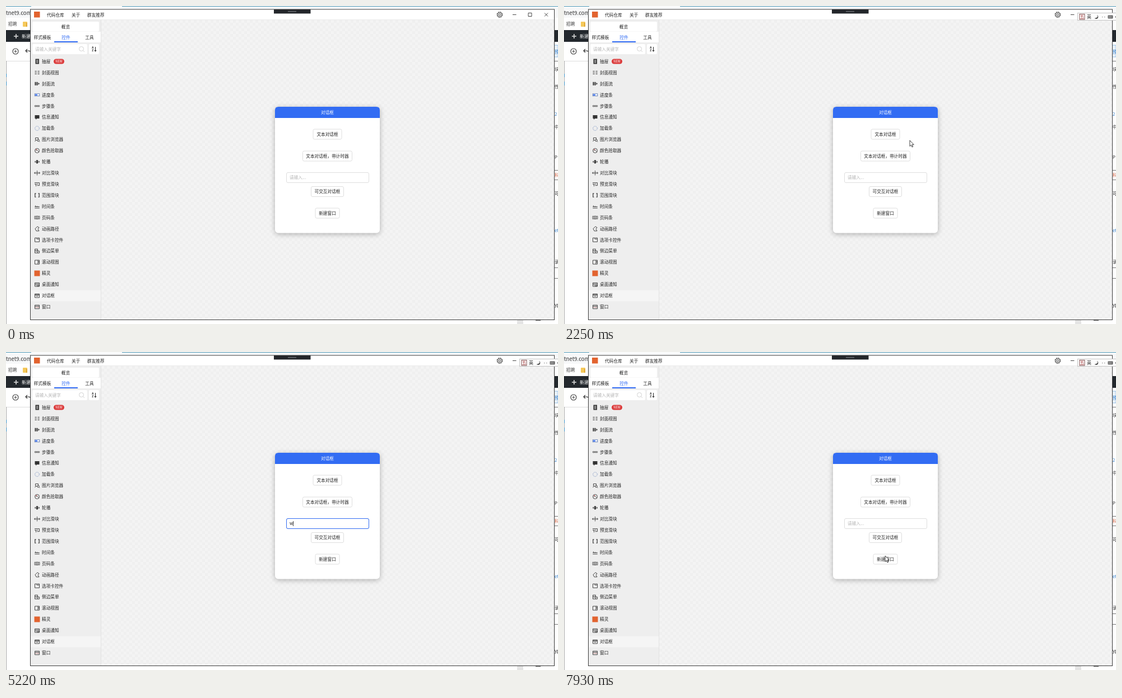
These frames come from a looping animation (985 px wide and 568 px high, 8 s). An HTML page:

```html
<!DOCTYPE html>
<html lang="zh-CN">
<head>
<meta charset="utf-8">
<title>对话框</title>
<style>
html, body { margin: 0; width: 100%; height: 100%; overflow: hidden; background: #fff; }
svg { display: block; width: 100vw; height: 100vh; }
text { font-family: "Noto Sans CJK SC", "Noto Sans CJK JP", "Noto Sans", sans-serif; }
.line { fill: none; stroke: #333; stroke-width: .9; }
.field { fill: #fff; stroke: #dedede; }
.focus { fill: none; stroke: #326cf3; }
.card { filter: drop-shadow(0 2px 5px rgba(0,0,0,.28)); }
.a { animation: 8s linear infinite; }
.step { animation-timing-function: step-end; }
</style>
</head>
<body>
<script>
const BLUE = '#326cf3', ORANGE = '#e2632f';

// Markup helpers; text is placed by its vertical centre.
const text = (x, y, s, o = {}) => {
  const { size = 7.65, fill = '#222', anchor = 'start', weight = 400 } = o;
  return `<text x="${x}" y="${y + size * .37}" font-size="${size}" fill="${fill}" text-anchor="${anchor}" font-weight="${weight}">${s}</text>`;
};
const mid = (x, y, s, o) => text(x, y, s, { anchor: 'middle', ...o });
const rect = (x, y, w, h, fill, r = 0, extra = '') =>
  `<rect x="${x}" y="${y}" width="${w}" height="${h}" rx="${r}" fill="${fill}" ${extra}/>`;
const field = (x, y, w, h, cls = 'field') =>
  `<rect class="${cls}" x="${x + .5}" y="${y + .5}" width="${w - 1}" height="${h - 1}" rx="2.5"/>`;
const line = (d, extra = '') => `<path class="line" d="${d}" ${extra}/>`;
const solid = (d, fill = '#333') => `<path d="${d}" fill="${fill}"/>`;
const ring = (x, y, r, extra = '') => `<circle class="line" cx="${x}" cy="${y}" r="${r}" ${extra}/>`;
const at = (x, y, s) => `<g transform="translate(${x} ${y})">${s}</g>`;
const anim = (name, s, step = true) =>
  `<g class="a ${step ? 'step' : ''}" style="animation-name:${name}">${s}</g>`;

// Keyframes from times in milliseconds.
const LOOP = 8000;
const keyframes = (name, frames) =>
  `@keyframes ${name}{${frames.map(([t, css]) => `${t / LOOP * 100}%{${css}}`).join('')}}`;
const pulses = (name, spans, on = 1, off = 0) => keyframes(name, [
  [0, `opacity:${off}`],
  ...spans.flatMap(([a, b]) => [[a, `opacity:${on}`], [b, `opacity:${off}`]]),
  [LOOP, `opacity:${off}`]]);

const modalTimes = [[835, 2090], [2760, 4110], [6000, 7090]];
const fades = (name, off, on) => keyframes(name, [
  [0, `opacity:${off}`],
  ...modalTimes.flatMap(([a, b]) => [
    [a, `opacity:${off}`], [a + 130, `opacity:${on}`],
    [b, `opacity:${on}`], [b + 120, `opacity:${off}`]]),
  [LOOP, `opacity:${off}`]]);

const clicks = [780, 1990, 2690, 3980, 4800, 5870, 7030].map(t => [t, t + 140]);
const imeShown = clicks.map(([, end], i) => [end, i + 1 < clicks.length ? clicks[i + 1][0] : LOOP - 1]);
const path = [
  [0, 600, 567], [150, 600, 567], [700, 564, 232], [1320, 564, 232], [1900, 626, 224],
  [2130, 626, 224], [2250, 617, 240], [2620, 597, 265], [3000, 597, 265], [3650, 627, 224],
  [4200, 627, 224], [4460, 606, 278], [4780, 558, 306], [5560, 558, 306], [5850, 567, 329],
  [6290, 567, 329], [6540, 540, 262], [6900, 516, 333], [7250, 516, 333], [7720, 573, 356],
  [7850, 573, 359], [7930, 573, 364], [LOOP, 573, 364]];

const css = [
  fades('modal', 0, 1),
  fades('disabled', 1, .4),
  pulses('waiting', [[0, 2600]]),
  pulses('timer', [[2600, 5000]]),
  pulses('prompt', [[5000, 7990]]),
  keyframes('progress', [[0, 'stroke-dasharray:0 100'], [2780, 'stroke-dasharray:0 100'],
    [4230, 'stroke-dasharray:29 100'], [LOOP, 'stroke-dasharray:29 100']]),
  pulses('click', clicks),
  pulses('ime', imeShown),
  pulses('arrow', [[150, 4680], [5600, 7999]]),
  pulses('beam', [[4680, 5210]]),
  pulses('hint', [[0, 5210], [7100, 7999]]),
  pulses('focused', [[4820, 5960]]),
  pulses('caret0', [[4820, 5210]]),
  pulses('typed1', [[5210, 5400]]),
  pulses('typed2', [[5400, 7100]]),
  pulses('caret2', [[5400, 5900]]),
  pulses('hover', [[6390, 6680]]),
  keyframes('move', path.map(([t, x, y]) =>
    [t, `transform:translate(${x}px,${y}px);animation-timing-function:ease-in-out`])),
].join('\n');

// Page behind the window.
const sideBits = [
  [82, '预', '#2878c8'], [113, '块', '#333'], [144, '性', '#333'], [193, '2', '#2878c8'],
  [216, '中', '#333'], [270, 'P', '#333'], [302, '科', '#c8502c'], [335, '可', '#111'],
  [401, 'et', '#2878c8'], [457, '录', '#333'], [534, 'yp', '#111']];
const page = () => [
  rect(0, 0, 985, 568, '#fff'),
  rect(0, 0, 45, 1, '#4f9ab8'), rect(207, 0, 778, 1, '#4f9ab8'),
  rect(0, 1, 985, 20, '#f7f8f9'),
  text(0, 12, 'tnet9.com/', { size: 9.6, fill: '#333' }),
  text(4, 32, '招聘', { fill: '#333' }),
  rect(30, 28, 8, 9, '#f5c95c', 1), rect(36, 30, 2, 7, '#e0a93a'),
  rect(0, 43, 985, 21, '#23282d'),
  text(-2, 54, ')', { size: 8, fill: '#aaa' }),
  line('M14 54h8M18 50v8', 'style="stroke:#ddd;stroke-width:1.6"'),
  text(28, 54, '新建', { fill: '#fff', size: 8 }),
  ring(17, 81, 5, 'style="stroke-width:1.1"'), line('M14.5 81h5M17 78.5v5'),
  line('M38 77l-3 3 3 3M35 80h6q4 1 3 6', 'style="stroke-width:1.2"'),
  rect(0, 98, 44, 1, '#ddd'), rect(0, 98, 1, 470, '#aaa'),
  rect(0, 121, 1, 6, '#3a92c8'), rect(0, 135, 1, 7, '#3a92c8'),
  rect(978, 70, 7, 21, '#e8f1fa', 0, 'stroke="#7db0dc" stroke-width=".8"'),
  ...[98, 293, 310, 467, 486].map(y => rect(978, y, 7, 1, '#777')),
  ...sideBits.map(([y, s, fill]) => text(979, y, s, { fill })),
  rect(912, 561, 11, 7, '#e4e4e4'), rect(945, 561, 9, 1, '#555'),
].join('');

// Sidebar entries: label and 10 by 10 icon.
const box = 'M1 2h8v6.5h-8zM1 4h8';
const items = [
  ['抽屉', solid('M2 .5h6.5v9h-6.5z') + rect(3.5, 2, 3.5, 6, '#888')],
  ['封面视图', line('M1 2.5h3.2M6 2.5h3.2M1 5h3.2M6 5h3.2M1 7.5h3.2M6 7.5h3.2')],
  ['封面流', solid('M1 2h2v6h-2zM4 2h2v6h-2zM7 3l2.5 2-2.5 2z')],
  ['进度条', rect(.8, 3, 8.5, 4, '#fff', 0, 'stroke="#4868a8" stroke-width=".8"') + rect(1.5, 4, 4, 2, BLUE)],
  ['步骤条', ring(2, 5, 1.2) + ring(5, 5, 1.2) + ring(8, 5, 1.2)],
  ['信息通知', solid('M1 1.5h8v6h-4.5l-2 2v-2h-1.5z')],
  ['加载条', ring(5, 5, 3.8, 'stroke-dasharray="1 1.4" style="stroke:#4d6fb0"')],
  ['图片浏览器', line('M2 6V2h5v3M1 8.5l2.5-3 2 2') + ring(7, 6.5, 1.8) + line('M8.2 7.8l1.5 1.6')],
  ['颜色拾取器', ring(5, 5, 4) + line('M2.5 5.5l2-2 2 2 2 2') + solid('M3 2.5h1.5v1.5h-1.5z', '#c44')],
  ['轮播', solid('M3.5 2h3v6h-3zM2.5 3v4l-2-2zM7.5 3v4l2-2z')],
  ['对比滑块', line('M5 .8v8.4M0 5h10M2 3.2l-2 1.8 2 1.8M8 3.2l2 1.8-2 1.8')],
  ['预览滑块', line('M.5 2.5h8.5v5h-4M.5 5h4M3 5v4M6 4v2')],
  ['范围滑块', line('M3 1.8h-1.7v6.4h1.7M7 1.8h1.7v6.4h-1.7', 'style="stroke-width:1.2"')],
  ['时间条', line('M.8 8h8.5M.8 5.5h8.5M2 5.5v-2M4 5.5v-1M6 5.5v-1')],
  ['页码条', line('M2 2.5h-1.3v5h1.3M8 2.5h1.3v5h-1.3M3 2.5h4v5h-4zM5 4v2.4')],
  ['动画路径', line('M8.5 3l-3-2-4 4 2 4h5M8.5 3l-2 2.5 2 3.5')],
  ['选项卡控件', line('M1 8.5v-7h3.5v2h4.5v5zM5 1.5h4v2')],
  ['侧边菜单', line('M1 1.5h5v7h-5zM1 4h5M6 5h3v3.5h-3M2.5 6h2')],
  ['滚动视图', line('M1 1.5h8v7h-8zM6.5 1.5v7M7.7 3v3')],
  ['精灵', rect(0, 0, 10, 10, ORANGE)],
  ['桌面通知', line(box + 'M5 6h3v2h-3zM2 6h2')],
  ['对话框', line(box + 'M3 6h4M1 2.6h8')],
  ['窗口', line(box) + line('M2 6h2M5 6h3', 'style="stroke:#a55"')],
];
const list = () => items.map(([label, icon], i) => {
  const y = 99 + i * 19.92;
  return at(50.5, y - 5, icon) + text(64, y, label) + (i ? '' :
    rect(85, 94.5, 19, 9, '#db3a3a', 4.5) + mid(94.5, y, 'NEW', { size: 5.6, fill: '#fff' }));
}).join('');

const sidebar = () => [
  rect(44, 25, 125, 535, '#eee'), rect(44, 507.5, 125, 20, '#f5f5f5'), rect(169, 25, .7, 535, '#ddd'),
  rect(44, 46, 125, 19, '#fff'),
  anim('disabled', [
    rect(47, 28, 119, 17.5, '#fff', 2), mid(106.5, 37, '概览'),
    rect(47, 68, 98, 18, '#fff', 2), text(52, 77, '请输入关键字', { fill: '#b5b5b5' }),
    ring(134.5, 76.5, 4, 'style="stroke:#ccc"'), line('M137.5 79.5l2.5 2.5', 'style="stroke:#ccc"'),
    rect(148, 68, 18, 18, '#fff', 2),
    mid(154.7, 74.5, 'A', { size: 4.8, weight: 700 }), mid(154.7, 79.5, 'Z', { size: 4.8, weight: 700 }),
    line('M159.5 73v8M157.8 79l1.7 2 1.7-2', 'style="stroke-width:1.1"'), list(),
  ].join(''), false),
  mid(65, 56, '样式模板'), mid(107, 56, '控件', { fill: BLUE }), mid(149, 56, '工具'),
  rect(86, 63, 42, 2, BLUE),
].join('');

const titleBar = () => [
  rect(44, 6, 934, 19, '#fff'), rect(44, 24.3, 934, .7, '#e2e2e2'),
  rect(50, 10, 10.5, 10.5, ORANGE),
  text(73, 16, '代码仓库'), text(117, 16, '关于'), text(145, 16, '群友推荐'),
  ring(881, 15.5, 1.8), ring(881, 15.5, 4), ring(881, 15.5, 5, 'stroke-dasharray="2.4 1.53"'),
  line('M904 15.5h6.5M932 12.5h6v6h-6zM961 12.5l6 6M967 12.5l-6 6'),
  rect(478, 6, 65.5, 7.5, '#23262a'), rect(503, 9, 15, 1.5, '#686b70'),
].join('');

const button = (cx, y, w, label) =>
  field(cx - w / 2, y, w, 19) + mid(cx, y + 9.5, label);
const caret = x => rect(x, 302, .8, 9, '#111');
const card = () => [
  `<g class="card">${rect(480, 180, 187, 225.5, '#fff', 6)}</g>`,
  solid('M480 200v-14q0-6 6-6h175q6 0 6 6v14z', BLUE), mid(573.5, 190, '对话框', { fill: '#fff' }),
  anim('disabled', [
    button(573.5, 219.5, 52, '文本对话框'),
    button(573.5, 258.5, 89, '文本对话框，带计时器'),
    field(500, 297, 148, 19),
    anim('hint', text(506, 306.5, '请输入...', { fill: '#b5b5b5' })),
    anim('focused', field(500, 297, 148, 19, 'focus')),
    anim('caret0', caret(506)),
    anim('typed1', text(506, 306.5, 'w') + caret(512)),
    anim('typed2', text(506, 306.5, 'wq')),
    anim('caret2', caret(517)),
    button(573.5, 322, 59, '可交互对话框'),
    button(573.5, 360.5, 44, '新建窗口'),
  ].join(''), false),
].join('');

const closeButton = '<circle cx="626.7" cy="225" r="7" fill="#adbde7"/>' +
  line('M624 222.3l5.4 5.4M629.4 222.3l-5.4 5.4', 'style="stroke:#fff;stroke-width:1.3"');
const arc = (stroke, extra = '') =>
  `<circle cx="511.5" cy="292.5" r="36.2" fill="none" stroke="${stroke}" stroke-width="2.4" ${extra}/>`;
const modal = () => anim('modal', [
  '<path d="M44 25H978V560H44ZM44 46V65H169V46Z" fill-rule="evenodd" fill-opacity=".25"/>',
  rect(387, 215.5, 249, 154, '#fff', 6),
  anim('waiting', mid(511.5, 293, '请稍后...', { size: 14.8, weight: 700 }) + closeButton),
  anim('timer', arc('#ededed') +
    arc(BLUE, 'class="a" style="animation-name:progress" pathLength="100" transform="rotate(-90 511.5 292.5)"') +
    mid(511.5, 293, '请稍后...', { size: 12.8, weight: 700 }) + closeButton),
  anim('prompt', [
    `<g style="--f:0">${mid(511.5, 254, 'wq', { size: 15.5, weight: 700 })}</g>`.replace(' style="--f:0"', ''),
    field(407, 282.5, 209, 19), text(412, 292, '请输入...', { fill: '#b5b5b5' }),
    anim('hover', field(407, 282.5, 209, 19, 'focus')),
    rect(474, 321, 75, 19, BLUE, 2.5), mid(511.5, 331, '确定', { fill: '#fff', weight: 500 }),
  ].join('')),
].join(''), false);

const ime = () => anim('ime', [
  rect(916.5, 12.5, 72, 13, '#fdfdfd', 0, 'stroke="#c4c4c4"'),
  rect(920, 14.5, 9, 9.5, '#fff', 0, 'stroke="#743c3c" stroke-width=".9"'),
  mid(924.5, 19.3, '五', { size: 7.5, fill: '#a02c2c' }),
  mid(937, 19.3, '英', { size: 8 }),
  solid('M951 15.5q4 5-4.5 6.5q5.5 3 6.8-2.2q.2-3-2.3-4.3z', '#444'),
  solid('M960 19h1.3v1.3h-1.3zM964 19h1.3v1.3h-1.3z', '#888'),
  rect(970.5, 16.5, 9, 6, '#666', 1), line('M972 18.5h6M972 20.5h6', 'stroke-dasharray="1 1" style="stroke:#fff"'),
  solid('M983.5 18.5h2v2h-2z', '#777'),
].join(''));

const cursor = () => anim('move', [
  anim('click', '<circle r="7.5" fill="#c6d034" opacity=".78"/>'),
  anim('arrow', '<path d="M0 0V10.5L2.4 8.3 4 12 5.7 11.3 4.1 7.7H7.3Z" fill="#fff" stroke="#111" stroke-width=".8"/>'),
  anim('beam', line('M-2 -5.5h4M0 -5.5v11M-2 5.5h4')),
].join(''), false);

document.head.insertAdjacentHTML('beforeend', `<style>${css}</style>`);
document.body.innerHTML = `<svg viewBox="0 0 985 568">
  <defs><pattern id="check" width="10" height="10" patternUnits="userSpaceOnUse">
    ${rect(0, 0, 10, 10, '#f4f4f4')}${rect(0, 0, 5, 5, '#efefef')}${rect(5, 5, 5, 5, '#efefef')}
  </pattern></defs>
  ${page()}
  ${rect(44, 6, 934, 554, 'url(#check)')}
  ${titleBar()}${sidebar()}${card()}${modal()}
  ${rect(43.5, 6, 935, 554.5, 'none', 0, 'stroke="#3c3c3c"')}
  ${ime()}${cursor()}
</svg>`;
</script>
</body>
</html>
```
